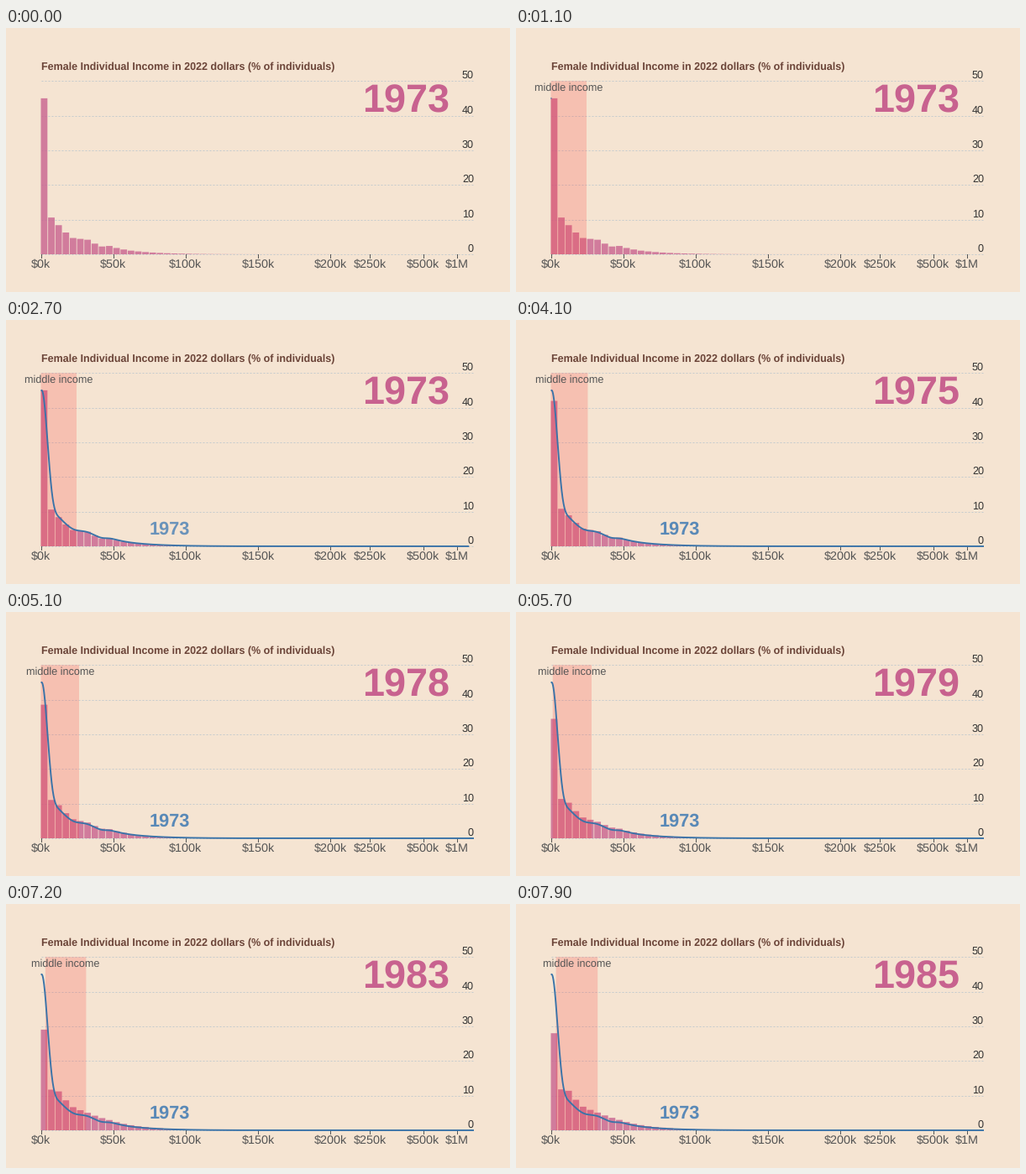
These frames come from a looping animation (600 px wide and 315 px high, 8 s). A matplotlib script:

```python
import numpy as np
import matplotlib as mpl
import matplotlib.pyplot as plt
from matplotlib.animation import FuncAnimation
from matplotlib.patches import Rectangle

W, H, DPI = 600, 315, 100
STEP, FRAMES = 100, 80

BG = "#f5e4d2"
PINK = "#c8628f"
BLUE = "#3a73a8"
X0, X1, Y0, Y50 = 41.5, 557, 270, 63.2
PER_K = 1.7235
BAR = 5 * PER_K
N_BARS = 40
YEARS_START, YEAR_MS = 3200, 400

mpl.rcParams["font.family"] = "Liberation Sans"
mpl.rcParams["text.hinting"] = "none"


def shares(values):
    """Share per $5k bracket, geometric between a few known brackets."""
    known = [0, 1, 2, 4, 6, 8, 9, 12, 20, 30]
    return np.exp(np.interp(np.arange(N_BARS), known, np.log(values)))


FIRST = shares([45, 10.6, 8.4, 4.7, 4.2, 2.25, 2.4, 1.05, 0.15, 0.01])
LAST = shares([28, 11.8, 11.4, 6.8, 5.1, 3.6, 3.0, 1.5, 0.25, 0.01])

# How far the shares have moved from FIRST to LAST, and the band's edges.
KEY_YEARS = [1973, 1977.75, 1980.75, 1984.75]
PROGRESS = [0, 0.38, 0.86, 1]
BAND_LEFT = [X0, X0, 46, 47.6]
BAND_RIGHT = [84, 87, 93, 97.2]


def y_px(share):
    return Y0 - np.asarray(share) * (Y0 - Y50) / 50


def ease(t, start, length):
    """Cubic ease in and out between 0 and 1."""
    u = np.clip((t - start) / length, 0, 1)
    return 4 * u ** 3 if u < 0.5 else 1 - 4 * (1 - u) ** 3


def b_spline(points, steps=24):
    """Uniform cubic B-spline that touches both end points."""
    p = np.vstack([points[:1]] * 2 + [points] + [points[-1:]] * 2)
    u = np.linspace(0, 1, steps, endpoint=False)[:, None]
    weights = [(1 - u) ** 3, 3 * u ** 3 - 6 * u ** 2 + 4,
               -3 * u ** 3 + 3 * u ** 2 + 3 * u + 1, u ** 3]
    parts = [sum(w * q for w, q in zip(weights, p[i:i + 4])) / 6
             for i in range(len(p) - 3)]
    return np.vstack(parts + [points[-1:]])


mids = X0 + (np.arange(N_BARS) + 0.5) * BAR
curve_x, curve_y = b_spline(np.column_stack([
    np.concatenate([[X0], mids, [X1]]),
    y_px(np.concatenate([FIRST[:1], FIRST, [0]]))])).T
arc = np.concatenate([[0], np.cumsum(np.hypot(np.diff(curve_x), np.diff(curve_y)))])

fig = plt.figure(figsize=(W / DPI, H / DPI), dpi=DPI, facecolor=BG)
ax = fig.add_axes([0, 0, 1, 1])
ax.set_xlim(0, W)
ax.set_ylim(H, 0)
ax.axis("off")


def px(n):
    return n * 72 / DPI


def label(x, y, s, size, color, **kw):
    return ax.text(x, y, s, fontsize=px(size), color=color, va="baseline",
                   zorder=6, **kw)


def rect(x, width, **kw):
    return ax.add_patch(Rectangle((x, Y50), width, Y0 - Y50, lw=0, snap=False, **kw))


for v in range(0, 51, 10):
    y = y_px(v)
    ax.plot([X0, X1], [y, y], color="#c5cbce", lw=px(1), zorder=1,
            dashes=(2, 2), dash_capstyle="butt")
    label(X1, y - 3, str(v), 12.6, "#333333", ha="right")

places = {f"${k}k": X0 + k * PER_K for k in range(0, 201, 50)}
places.update({"$250k": 433.2, "$500k": 496.7, "$1M": 536.7})
for s, x in places.items():
    ax.plot([x, x], [Y0, Y0 + 4], color="#555555", lw=px(1), zorder=2)
    label(x, 286.3, s, 14.4, "#555555", ha="center")

label(X0, 50.3, "Female Individual Income in 2022 dollars (% of individuals)",
      12.52, "#6b4438", weight="bold")
year_text = label(424.4, 100.8, "1973", 46.8, PINK, weight="bold")

bars = [rect(x - BAR / 2, BAR - 0.8, fc=PINK, alpha=0.8, zorder=3) for x in mids]
band = rect(X0, 1, fc="#ff322d", zorder=4)
band_text = label(0, 75, "middle income", 12.6, "#555555", ha="center")
line, = ax.plot([], [], color=BLUE, lw=px(1.9), zorder=5, solid_capstyle="butt")
line_text = label(194.6, 255.6, "1973", 21.8, "#4c81b5", ha="center", weight="bold")


def draw(n):
    t = n * STEP
    year = 1973 + max(0, t - YEARS_START) / YEAR_MS
    year_text.set_text(str(int(year + 0.5)))

    progress, left, right = (np.interp(year, KEY_YEARS, values)
                             for values in (PROGRESS, BAND_LEFT, BAND_RIGHT))
    for bar, top in zip(bars, y_px(FIRST + (LAST - FIRST) * progress)):
        bar.set_y(top)
        bar.set_height(Y0 - top)

    shown = ease(t, 0, 1000)
    band.set_x(left)
    band.set_width(right - left)
    band.set_alpha(0.2 * shown)
    band_text.set_x((left + right) / 2)
    band_text.set_alpha(shown)

    reach = arc[-1] * ease(t, 960, 2000)
    drawn = arc < reach
    end_x, end_y = (np.interp(reach, arc, c) for c in (curve_x, curve_y))
    line.set_data(np.append(curve_x[drawn], end_x), np.append(curve_y[drawn], end_y))
    line.set_visible(reach > 0)
    line_text.set_alpha(0.92 * ease(t, 2000, 1000))
    return []


anim = FuncAnimation(fig, draw, frames=FRAMES, interval=STEP, repeat=True,
                     repeat_delay=0, init_func=lambda: draw(0))
plt.show()
```
